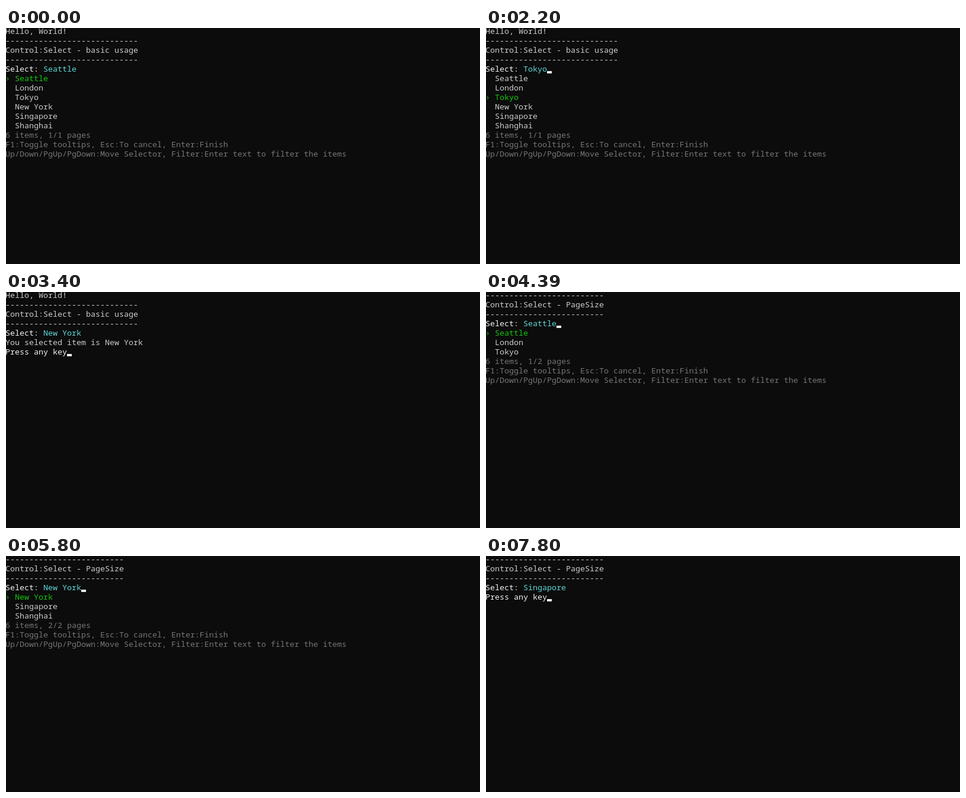
These frames come from a looping animation (800x400 px, 8000 ms). An HTML page:

```html
<!DOCTYPE html>
<html lang="en">
<head>
<meta charset="utf-8">
<title>Console select</title>
<style>
  html, body { margin: 0; width: 100%; height: 100%; overflow: hidden; background: #0c0c0c; }
  #screen {
    position: absolute; left: -1px; top: -3px; margin: 0;
    font: 13.3333px/16px "Noto Sans Mono", "DejaVu Sans Mono", monospace;
    font-variant-ligatures: none; white-space: pre; color: #ccc;
  }
  .line { height: 16px; }
  .bright { color: #f2f2f2; }
  .answer { color: #61d6d6; }
  .picked { color: #16c60c; }
  .hint { color: #767676; }
  #cursor { position: absolute; width: 8px; height: 4px; background: #f2f2f2; }
</style>
</head>
<body>
<div id="screen"></div>
<div id="cursor"></div>
<script>
const LOOP = 8000, CELL_W = 8, CELL_H = 16;
const cities = ['Seattle', 'London', 'Tokyo', 'New York', 'Singapore', 'Shanghai'];
const screen = document.getElementById('screen');
const cursor = document.getElementById('cursor');

// Cursor visibility, as [on, off] spans in ms
const blinks = [[200, 810], [1200, 1800], [2200, 2790], [3400, 3800],
                [4390, 4990], [5580, 6000], [6590, 7190], [7800, 8000]];

// demo: 0 basic, 1 paged; pick: index of the highlighted city
const steps = [
  { at: 0, demo: 0, pick: 0 },
  { at: 1600, demo: 0, pick: 1 },
  { at: 2200, demo: 0, pick: 2 },
  { at: 2390, demo: 0, pick: 3 },
  { at: 3400, demo: 0, pick: 3, done: true },
  { at: 4000, demo: 1, pick: 0 },
  { at: 5800, demo: 1, pick: 3 },
  { at: 6990, demo: 1, pick: 4 },
  { at: 7800, demo: 1, pick: 4, done: true }
];

const span = (cls, text) => `<span class="${cls}">${text}</span>`;

function header(title) {
  const rule = '-'.repeat(title.length);
  return [rule, title, rule];
}

function menu(pick, size) {
  const page = Math.floor(pick / size), pages = Math.ceil(cities.length / size);
  const items = cities.slice(page * size, (page + 1) * size).map(city =>
    city === cities[pick] ? span('picked', '› ' + city) : '  ' + city);
  const hints = [
    `${cities.length} items, ${page + 1}/${pages} pages`,
    'F1:Toggle tooltips, Esc:To cancel, Enter:Finish',
    'Up/Down/PgUp/PgDown:Move Selector, Filter:Enter text to filter the items'
  ];
  return [...items, ...hints.map(text => span('hint', text))];
}

function draw({ demo, pick, done }) {
  const city = cities[pick], label = 'Select: ', wait = 'Press any key';
  const lines = demo ? header('Control:Select - PageSize')
                     : ['Hello, World!', ...header('Control:Select - basic usage')];
  let row = lines.length, col = label.length + city.length;
  lines.push(span('bright', label) + span('answer', city));
  if (done) {
    if (!demo) lines.push('You selected item is ' + city);
    row = lines.length;
    col = wait.length;
    lines.push(span('bright', wait));
  } else {
    lines.push(...menu(pick, demo ? 3 : 6));
  }
  screen.innerHTML = lines.map(text => `<div class="line">${text}</div>`).join('');
  cursor.style.left = col * CELL_W - 1 + 'px';
  cursor.style.top = row * CELL_H + 9 + 'px';
}

let shown, start;
function tick(now) {
  start ??= now;
  const t = (now - start) % LOOP;
  const step = steps.findLast(s => s.at <= t);
  if (step !== shown) draw(shown = step);
  const lit = blinks.some(([on, off]) => t >= on && t < off);
  cursor.style.visibility = lit ? 'visible' : 'hidden';
  requestAnimationFrame(tick);
}
requestAnimationFrame(tick);
</script>
</body>
</html>
```
